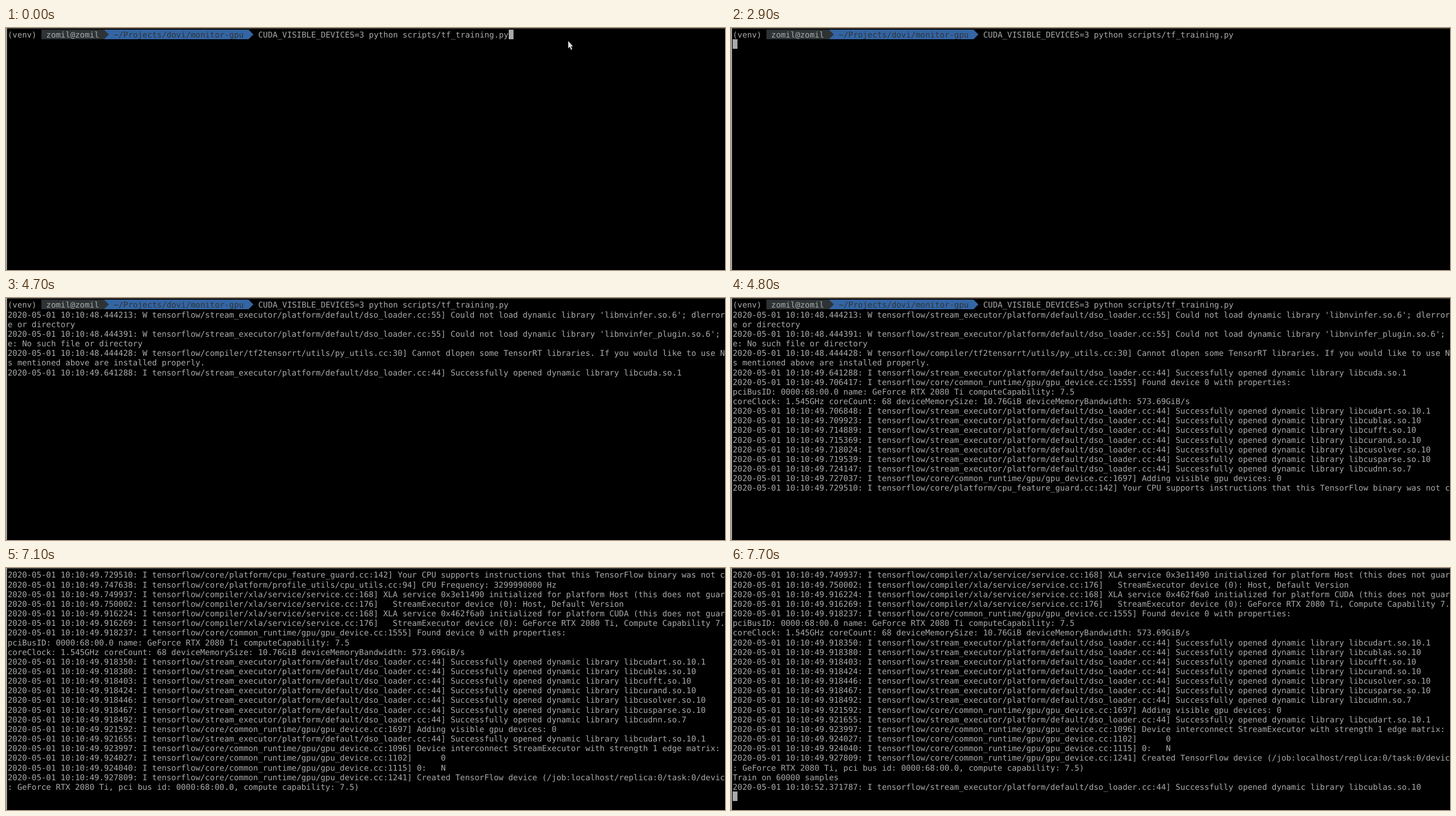
An HTML page for the animation above (8 s loop, 1280 by 431 pixels).

```html
<!DOCTYPE html>
<html lang="en">
<head>
<meta charset="utf-8">
<title>Terminal training run</title>
<style>
  html, body { margin: 0; width: 100%; height: 100%; overflow: hidden; background: #000; }
  svg { display: block; width: 1280px; height: 431px; }
  text {
    font: 14.247px "DejaVu Sans Mono", "Noto Sans Mono", monospace;
    fill: #aaa;
    white-space: pre;
    text-rendering: geometricPrecision;
  }
</style>
</head>
<body>
<svg id="stage" viewBox="0 0 1280 431">
  <rect width="1280" height="431" fill="#000"/>
  <g id="screen"></g>
  <rect id="caret" width="8.5" height="17" fill="#aaa"/>
  <path id="mouse" d="M0 0V13.2L2.9 10.6L5 15.8L7.2 14.9L5.1 9.8H8.6Z" fill="#dcdcdc"/>
  <rect width="1280" height="1.6" fill="#3c3b37"/>
  <rect width="1.6" height="431" fill="#c8c8c8"/>
</svg>
<script>
const LOOP = 8000, COL = 8.577, ROW = 17.16, X0 = 3, Y0 = 3.1, BASE = 14.3, FIT = 23;
const NS = "http://www.w3.org/2000/svg";
const screen = document.getElementById("screen");
const caret = document.getElementById("caret");
const mouse = document.getElementById("mouse");
const colX = c => X0 + c * COL;
const rowY = r => Y0 + r * ROW;

function add(parent, tag, attrs, content) {
  const el = document.createElementNS(NS, tag);
  for (const key in attrs) el.setAttribute(key, attrs[key]);
  if (content) el.textContent = content;
  parent.appendChild(el);
  return el;
}

const write = (g, col, str, fill) =>
  add(g, "text", { x: colX(col), y: BASE, style: fill ? "fill:" + fill : "" }, str);

function segment(g, from, to, fill) {
  const a = colX(from), b = colX(to);
  add(g, "path", { d: `M${a} 0H${b}L${b + COL} 8.5L${b} 17H${a}Z`, fill });
}

function prompt(g) {
  const dark = "#2e3436";
  segment(g, 20, 50, "#3465a4");
  segment(g, 7, 20, dark);
  write(g, 0, "(venv)");
  write(g, 8, "zomil@zomil");
  write(g, 22, "~/Projects/dovi/monitor-gpu", dark);
  write(g, 52, "CUDA_VISIBLE_DEVICES=3 python scripts/tf_training.py");
}

// Log lines
const log = (sec, level, path, msg) => `2020-05-01 10:10:${sec}: ${level} tensorflow/${path}] ${msg}`;
const loader = "stream_executor/platform/default/dso_loader.cc:";
const device = (sec, line, msg) => log(sec, "I", "core/common_runtime/gpu/gpu_device.cc:" + line, msg);
const xla = (sec, line, msg) => log(sec, "I", "compiler/xla/service/service.cc:" + line, msg);
const opened = (sec, lib) => log(sec, "I", loader + 44, "Successfully opened dynamic library lib" + lib);
const missing = (sec, tail) => log(sec, "W", loader + 55, "Could not load dynamic library 'libnvinfer" + tail);

const libs = ["cudart.so.10.1", "cublas.so.10", "cufft.so.10", "curand.so.10",
  "cusolver.so.10", "cusparse.so.10", "cudnn.so.7"];
const openAll = (sec, micros) => libs.map((lib, i) => opened(sec + micros[i], lib));
const found = sec => [
  device(sec, 1555, "Found device 0 with properties:"),
  "pciBusID: 0000:68:00.0 name: GeForce RTX 2080 Ti computeCapability: 7.5",
  "coreClock: 1.545GHz coreCount: 68 deviceMemorySize: 10.76GiB deviceMemoryBandwidth: 573.69GiB/s"
];

const lines = [
  "",
  missing("48.444213", ".so.6'; dlerror"),
  "e or directory",
  missing("48.444391", "_plugin.so.6';"),
  "e: No such file or directory",
  log("48.444428", "W", "compiler/tf2tensorrt/utils/py_utils.cc:30",
    "Cannot dlopen some TensorRT libraries. If you would like to use NV"),
  "s mentioned above are installed properly.",
  opened("49.641288", "cuda.so.1"),
  ...found("49.706417"),
  ...openAll("49.7", ["06848", "09923", "14889", "15369", "18024", "19539", "24147"]),
  device("49.727037", 1697, "Adding visible gpu devices: 0"),
  log("49.729510", "I", "core/platform/cpu_feature_guard.cc:142",
    "Your CPU supports instructions that this TensorFlow binary was not co"),
  log("49.747638", "I", "core/platform/profile_utils/cpu_utils.cc:94", "CPU Frequency: 3299990000 Hz"),
  xla("49.749937", 168, "XLA service 0x3e11490 initialized for platform Host (this does not guar"),
  xla("49.750002", 176, "  StreamExecutor device (0): Host, Default Version"),
  xla("49.916224", 168, "XLA service 0x462f6a0 initialized for platform CUDA (this does not guar"),
  xla("49.916269", 176, "  StreamExecutor device (0): GeForce RTX 2080 Ti, Compute Capability 7."),
  ...found("49.918237"),
  ...openAll("49.918", ["350", "380", "403", "424", "446", "467", "492"]),
  device("49.921592", 1697, "Adding visible gpu devices: 0"),
  opened("49.921655", "cudart.so.10.1"),
  device("49.923997", 1096, "Device interconnect StreamExecutor with strength 1 edge matrix:"),
  device("49.924027", 1102, "     0"),
  device("49.924040", 1115, "0:   N"),
  device("49.927809", 1241, "Created TensorFlow device (/job:localhost/replica:0/task:0/devic"),
  ": GeForce RTX 2080 Ti, pci bus id: 0000:68:00.0, compute capability: 7.5)",
  "Train on 60000 samples",
  opened("52.371787", "cublas.so.10")
];

const rows = lines.map((str, i) => {
  const g = add(screen, "g", {});
  if (i) write(g, 0, str); else prompt(g);
  return g;
});

// [start time, number of lines printed]
const output = [[0, 1], [3400, 7], [4700, 8], [4800, 20], [4900, 42], [7300, 44]];
const TYPED = 1700, ENTER = 1900, BLINK = 600;

function draw(t) {
  const count = output.filter(step => t >= step[0]).pop()[1];
  const top = Math.max(0, count - FIT);
  rows.forEach((g, i) => {
    const shown = i >= top && i < count;
    g.setAttribute("display", shown ? "inline" : "none");
    if (shown) g.setAttribute("transform", `translate(0 ${rowY(i - top)})`);
  });

  // A key press restarts the blink
  const phase = t < TYPED ? t + 500 : t - TYPED;
  const lit = Math.floor(phase / BLINK) % 2 === 0;
  const typing = t < ENTER;
  caret.setAttribute("display", lit ? "inline" : "none");
  caret.setAttribute("x", Math.round(colX(typing ? 104 : 0)));
  caret.setAttribute("y", Math.round(rowY(typing ? 0 : count - top)));

  mouse.setAttribute("display", t < TYPED ? "inline" : "none");
  mouse.setAttribute("transform", t < 100 ? "translate(1000.8 23)" : "translate(996.8 15)");
}

function tick() {
  draw(performance.now() % LOOP);
  requestAnimationFrame(tick);
}
tick();
</script>
</body>
</html>
```
